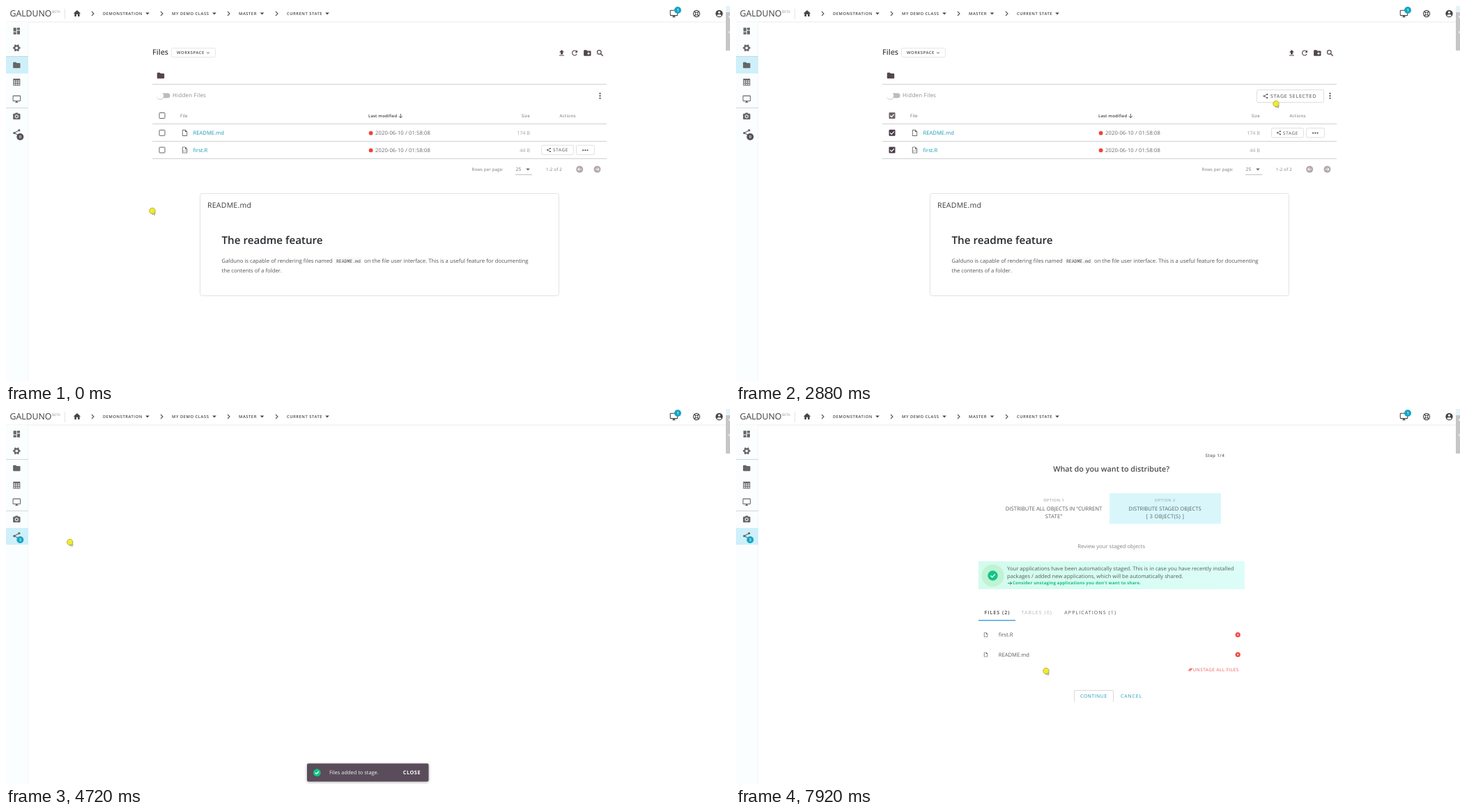
An HTML page with a canvas for the animation above (8 s loop, 1039 px wide and 539 px high).

```html
<!DOCTYPE html>
<html lang="en">
<head>
<meta charset="utf-8">
<title>Staging files</title>
<style>
html, body { margin: 0; width: 100%; height: 100%; overflow: hidden; background: #fff; }
canvas { display: block; width: 1039px; height: 539px; }
</style>
</head>
<body>
<canvas id="stage"></canvas>
<script>
const W = 1039, H = 539, LOOP = 8000, STEP = 80;
const canvas = document.getElementById('stage');
const c = canvas.getContext('2d');
const dpr = window.devicePixelRatio || 1;
canvas.width = W * dpr;
canvas.height = H * dpr;

const SANS = '"Open Sans", "Noto Sans", sans-serif';
const MONO = '"Noto Sans Mono", "DejaVu Sans Mono", monospace';
const TEAL = '#1899b8', BADGE = '#17a5c3', PLUM = '#54454f', GREY = '#666', RED = '#f2403a', GREEN = '#12c585';
const RULE = '#d2d0d2';

const PATHS = {
  home: 'M10 20v-6h4v6h5v-8h3L12 3 2 12h3v8z',
  tiles: 'M3 13h8V3H3zM3 21h8v-6H3zM13 21h8V11h-8zM13 3v6h8V3z',
  folder: 'M10 4H4a2 2 0 0 0-2 2v12a2 2 0 0 0 2 2h16a2 2 0 0 0 2-2V8a2 2 0 0 0-2-2h-8z',
  screen: 'M21 2H3a2 2 0 0 0-2 2v12a2 2 0 0 0 2 2h7v2H8v2h8v-2h-2v-2h7a2 2 0 0 0 2-2V4a2 2 0 0 0-2-2zM21 16H3V4h18z',
  file: 'M14 2H6a2 2 0 0 0-2 2v16a2 2 0 0 0 2 2h12a2 2 0 0 0 2-2V8zM6 20V4h7v5h5v11z',
  table: 'M2 2h20v20H2zM4 7v3h4V7zM10 7v3h4V7zM16 7v3h4V7zM4 12v3h4v-3zM10 12v3h4v-3zM16 12v3h4v-3zM4 17v3h4v-3zM10 17v3h4v-3zM16 17v3h4v-3z',
  camera: 'M9 3L7 5H4a2 2 0 0 0-2 2v12a2 2 0 0 0 2 2h16a2 2 0 0 0 2-2V7a2 2 0 0 0-2-2h-3l-2-2zM12 8a5 5 0 1 0 .01 0zM12 10a3 3 0 1 0 .01 0z',
  upload: 'M9 16h6v-6h4l-7-7-7 7h4zM5 18h14v2H5z'
};
for (const k in PATHS) PATHS[k] = new Path2D(PATHS[k]);

function text(s, x, y, size, color, ls = 0, weight = 400, align = 'left', family = SANS) {
  c.font = `${weight} ${size}px ${family}`;
  c.letterSpacing = ls + 'px';
  c.textAlign = align;
  c.fillStyle = color;
  c.fillText(s, x, y + size * 0.357);
}
function icon(name, x, y, size, color) {
  c.save();
  c.translate(x - size / 2, y - size / 2);
  c.scale(size / 24, size / 24);
  c.fillStyle = color;
  c.fill(PATHS[name], 'evenodd');
  c.restore();
}
function rect(x, y, w, h, color) {
  c.fillStyle = color;
  c.fillRect(x, y, w, h);
}
function box(x, y, w, h, r, fill, stroke) {
  c.beginPath();
  c.roundRect(x, y, w, h, r);
  if (fill) { c.fillStyle = fill; c.fill(); }
  if (stroke) { c.strokeStyle = stroke; c.lineWidth = 1; c.stroke(); }
}
function dot(x, y, r, fill, stroke, lw = 1) {
  c.beginPath();
  c.arc(x, y, r, 0, 7);
  if (fill) { c.fillStyle = fill; c.fill(); }
  if (stroke) { c.strokeStyle = stroke; c.lineWidth = lw; c.stroke(); }
}
function line(color, lw, ...p) {
  c.beginPath();
  for (let i = 0; i < p.length; i += 2) c.lineTo(p[i], p[i + 1]);
  c.strokeStyle = color;
  c.lineWidth = lw;
  c.stroke();
}
function caret(x, y, color) {
  c.beginPath();
  c.moveTo(x - 2.8, y - 1.4);
  c.lineTo(x + 2.8, y - 1.4);
  c.lineTo(x, y + 1.6);
  c.fillStyle = color;
  c.fill();
}
function tick(x, y, s, color, lw) {
  line(color, lw, x - s, y, x - s * 0.25, y + s * 0.7, x + s, y - s * 0.65);
}
function share(x, y, s, color) {
  line(color, s * 0.09, x + s * 0.27, y - s * 0.29, x - s * 0.27, y, x + s * 0.27, y + s * 0.29);
  for (const [i, j] of [[0.27, -0.29], [-0.27, 0], [0.27, 0.29]]) dot(x + i * s, y + j * s, s * 0.125, color);
}
function gear(x, y, r) {
  c.beginPath();
  for (let i = 0; i < 24; i++) {
    const a = (i + 0.5) * Math.PI / 12, k = (i + 1) % 4 < 2 ? r : r * 0.76;
    c.lineTo(x + k * Math.cos(a), y + k * Math.sin(a));
  }
  c.fillStyle = GREY;
  c.fill();
  dot(x, y, r * 0.35, '#fbfefe');
}
function badge(x, y, s, color) {
  dot(x, y, 5, color);
  text(s, x, y, 5.6, '#fff', 0, 600, 'center');
}

// Pointer track: time, x, y
const track = [
  [720, 210, 294.5], [1120, 224, 182], [1360, 224, 182], [1600, 224, 206], [2000, 224, 206],
  [2160, 400, 283], [2320, 640, 235], [2480, 778, 128.5], [2800, 778, 128.5], [2880, 775, 140.5],
  [2960, 782, 130], [3120, 782, 130], [3360, 480, 100], [3680, 24, 92], [4000, 25.5, 182.5],
  [4560, 25.5, 182.5], [5440, 390, 231.5], [5760, 390, 231.5], [6000, 389.5, 228.5], [6240, 389.5, 228.5],
  [6480, 548, 243.5], [6640, 645, 255], [6880, 645, 255], [7360, 560, 366], [7760, 480, 330],
  [7840, 455, 404], [7920, 445, 376.5]
];
const presses = [[1200, 1360], [1840, 2000], [3040, 3200], [4080, 4240], [6240, 6960]];
const clamp = v => Math.max(0, Math.min(1, v));

function pointer(t) {
  let a = track[0];
  for (const b of track) {
    if (t < b[0]) {
      const k = a === b ? 0 : clamp((t - a[0]) / (b[0] - a[0]));
      return [a[1] + (b[1] - a[1]) * k, a[2] + (b[2] - a[2]) * k];
    }
    a = b;
  }
  return [a[1], a[2]];
}
function hoveredRow(t) {
  const [x, y] = pointer(t);
  if (x < 210 || x > 862 || y < 170 || y > 219) return -1;
  return y < 194.5 ? 0 : 1;
}
function lastRow(t) {
  for (; t > 0; t -= STEP) {
    const r = hoveredRow(t);
    if (r >= 0) return r;
  }
  return 1;
}

function header() {
  rect(0, 22.5, W, 1, '#ececec');
  text('GALDUNO', 5.5, 11, 12.3, '#3c3c3c');
  text('BETA', 66, 8, 5, '#999');
  rect(84, 4, 1, 15, '#e4e4e4');
  icon('home', 102, 10.8, 12.5, '#444');
  const crumbs = [['DEMONSTRATION', 139, 203], ['MY DEMO CLASS', 238, 299], ['MASTER', 334, 367.5], ['CURRENT STATE', 403, 461]];
  for (const [s, x, cx] of crumbs) {
    const a = x - 16;
    line('#555', 1.1, a, 8, a + 3, 11, a, 14);
    text(s, x, 11, 5.8, '#444', 0.55, 600);
    caret(cx, 11, '#444');
  }
  icon('screen', 958.5, 11, 12.5, '#444');
  badge(964, 6, '1', BADGE);
  dot(991, 11, 4.6, null, '#444', 1.1);
  dot(991, 11, 2, null, '#444', 1);
  for (const [i, j] of [[1, 1], [1, -1], [-1, 1], [-1, -1]])
    line('#444', 1.6, 991 + i * 1.6, 11 + j * 1.6, 991 + i * 3.2, 11 + j * 3.2);
  dot(1023.5, 11, 5.2, '#444');
  dot(1023.5, 9.2, 1.6, '#fff');
  c.beginPath();
  c.ellipse(1023.5, 13.6, 3, 1.5, 0, 0, 7);
  c.fill();
  rect(1033, 0, 6, 9, '#e6f3f6');
  rect(1033, 9, 6, 55, '#c6c6c6');
  rect(1037, 14, 2, 3, '#e8e8e8');
  rect(1037, 36, 2, 3, '#e8e8e8');
}

function sidebar(t, onShare) {
  rect(0, 23, 32, H - 23, '#fbfefe');
  rect(31, 23, 1, H - 23, '#f0f5f6');
  if (t < 4720) {
    rect(0, 72, 32, 25, '#cef0fa');
    if (onShare) rect(0, 171, 32, 24, '#ebeef1');
  } else rect(0, 171, 32, 24, '#cef0fa');
  rect(0, 72, 32, 1, '#cfd5d6');
  rect(0, 146, 32, 1, '#cfd5d6');
  const x = 15.3;
  icon('tiles', x, 36, 12.5, GREY);
  gear(x, 60.3, 5.4);
  icon('folder', x, 85, 12.5, GREY);
  icon('table', x, 109.6, 12, GREY);
  icon('screen', x, 133.8, 12.5, GREY);
  icon('camera', x, 158.3, 12.5, GREY);
  share(x, 182.5, 13, GREY);
  const staged = t >= 3200;
  badge(20.3, 188, staged ? '3' : '0', staged ? BADGE : '#55505a');
}

function checkbox(y, mark) {
  if (!mark) return box(220, y - 4, 8, 8, 0.8, '#fff', '#666');
  box(219.5, y - 4.5, 9, 9, 1, mark === 'row' ? '#4b3d49' : '#6b646a');
  if (mark === 'some') rect(221.5, y - 0.6, 5, 1.2, '#fff');
  else tick(224, y, 2.9, '#fff', 1.2);
}

function filesPage(t) {
  const first = t >= 1280, second = t >= 1920;
  text('Files', 210, 66.5, 10.7, '#4c464c', 0, 600);
  box(237.5, 60.5, 63, 13, 2, '#fff', '#e6e6e6');
  text('WORKSPACE', 245, 67, 5.8, '#4c464c', 0.6, 600);
  line('#555', 0.9, 288, 66.4, 290, 68.2, 292, 66.4);

  icon('upload', 797.5, 67.5, 12, PLUM);
  c.beginPath();
  c.arc(816, 67.5, 3.4, 0.4, 5.6);
  c.strokeStyle = PLUM;
  c.lineWidth = 1.1;
  c.stroke();
  c.beginPath();
  c.moveTo(820, 63.4);
  c.lineTo(820, 67);
  c.lineTo(816.4, 67);
  c.fillStyle = PLUM;
  c.fill();
  icon('folder', 834.3, 67.5, 12.5, PLUM);
  line('#fff', 1, 834, 68.2, 838, 68.2);
  line('#fff', 1, 836, 66.2, 836, 70.2);
  dot(851.3, 66.4, 2.8, null, PLUM, 1.2);
  line(PLUM, 1.4, 853.4, 68.5, 856.6, 71.7);

  icon('folder', 222, 100, 12.5, PLUM);
  rect(210, 112, 652, 1, RULE);
  box(220, 125.3, 15.5, 7, 3.5, '#bcbcbc');
  dot(221.3, 129.6, 5.3, '#d4d4d4');
  dot(221, 128.8, 5, '#fff');
  text('Hidden Files', 239, 128.5, 8, '#8c8c8c', 0.2);
  for (const d of [-3.5, 0, 3.5]) dot(852.5, 129.2 + d, 1.1, '#4c464c');
  if (first) {
    box(747.5, 120.5, 96, 18, 2, '#fff', '#e0dee0');
    share(760, 129.5, 8.5, PLUM);
    text('STAGE SELECTED', 767, 129.5, 7, '#4c464c', 0.8);
  }

  const hover = hoveredRow(t), last = lastRow(t);
  if (hover >= 0) rect(210, 170 + hover * 24.5, 652, 24.5, '#f2eff1');
  checkbox(157.5, second ? 'all' : first ? 'some' : null);
  text('File', 250, 157.5, 6.2, '#6a6a6a', 0.25);
  text('Last modified', 520, 157.5, 5.9, '#3c3c3c', 0.2, 600);
  line('#444', 0.9, 566.3, 155, 566.3, 160.6);
  line('#444', 0.9, 563.8, 158.2, 566.3, 160.8, 568.8, 158.2);
  text('Size', 739.8, 157.5, 6.1, '#6a6a6a', 0.2);
  text('Actions', 794.5, 157.5, 6.1, '#6a6a6a', 0.35);
  for (const y of [169, 194, 219]) rect(210, y, 652, 1, RULE);

  const rows = [['README.md', '174 B', first], ['first.R', '44 B', second]];
  rows.forEach(([name, size, on], i) => {
    const y = 182.3 + i * 24.7;
    checkbox(y, on && 'row');
    icon('file', 256.5, y, 11, GREY);
    if (i) {
      line(GREY, 0.7, 255.8, y, 254.6, y + 1.3, 255.8, y + 2.6);
      line(GREY, 0.7, 257.2, y, 258.4, y + 1.3, 257.2, y + 2.6);
    }
    text(name, 268.5, y, 7.65, TEAL);
    dot(523.6, y + 0.4, 2.9, RED);
    text('2020-06-10 / 01:58:08', 530, y, 7.6, '#686868', 0.12);
    text(size, 752, y, 7.2, '#a2a2a2', 0, 400, 'right');
    if (i === last) {
      const fill = i === hover ? null : '#fff';
      box(768.5, y - 6.8, 46, 13.5, 2, fill, '#e2dfe1');
      share(779, y, 7.5, PLUM);
      text('STAGE', 785, y, 6.2, '#4c464c', 0.75);
      box(818.5, y - 6.8, 26, 13.5, 2, fill, '#e2dfe1');
      for (const d of [-3.2, 0, 3.2]) dot(831.3 + d, y + 0.3, 1.05, '#4c464c');
    }
  });

  text('Rows per page:', 668.5, 234.5, 6.1, '#777', 0.15);
  text('25', 731.5, 235, 6.8, '#777');
  caret(749, 235, '#666');
  rect(731, 242, 24, 1, '#c2c2c2');
  text('1-2 of 2', 775, 234.5, 6.1, '#777', 0.2);
  for (const [x, d] of [[823.2, -1], [848.5, 1]]) {
    dot(x, 234.7, 5, '#b4a9b2');
    line('#fff', 1, x - 2.6 * d, 234.7, x + 2.6 * d, 234.7);
    line('#fff', 1, x + 0.2 * d, 232.3, x + 2.6 * d, 234.7, x + 0.2 * d, 237.1);
  }

  box(278.5, 269.5, 515, 147, 3, '#fff', '#e2e2e2');
  text('README.md', 289, 286.5, 10.5, '#3a3a3a', 0.25);
  text('The readme feature', 309.5, 337, 15.2, '#24292e', 0, 600);
  text('Galduno is capable of rendering files named', 309.5, 366, 7.76, '#555');
  rect(472, 361, 39, 10, '#f9f9f9');
  text('README.md', 474, 366.2, 6.45, '#444', 0, 400, 'left', MONO);
  text('on the file user interface. This is a useful feature for documenting', 514, 366, 7.76, '#555');
  text('the contents of a folder.', 309.5, 380, 7.76, '#555');
}

function selection(t) {
  if (t < 6240 || t >= 7120) return;
  const [x, y] = pointer(Math.min(t, 6640));
  const row = Math.floor((y - 223.5) / 10.6);
  [717, 644, 582].forEach((end, i) => {
    if (i <= row) rect(389, 223 + i * 11, (i < row ? end : Math.min(x, end)) - 389, 11, '#92cfee');
  });
}

function distributePage(t) {
  text('Step 1/4', 673.5, 67, 6.3, '#666', 0.35, 600);
  text('What do you want to distribute?', 538.7, 86.5, 10.8, '#4c4c4c', 0, 600, 'center');
  rect(536, 121, 160, 44, '#d9f7fb');
  text('OPTION 1', 456.2, 131, 5.5, '#888', 0.6, 400, 'center');
  text('DISTRIBUTE ALL OBJECTS IN “CURRENT', 456, 143, 7.7, '#5a5a5a', 0, 400, 'center');
  text('STATE”', 456, 154, 7.7, '#5a5a5a', 0.2, 400, 'center');
  text('OPTION 2', 615.8, 131, 5.5, '#7f9a9f', 0.6, 400, 'center');
  text('DISTRIBUTE STAGED OBJECTS', 615.5, 143, 7.65, '#566', 0, 400, 'center');
  text('[ 3 OBJECT(S) ]', 615.8, 154, 7.65, '#566', 0.3, 400, 'center');
  text('Review your staged objects', 538.7, 197.5, 7.69, '#858585', 0, 400, 'center');

  const g = c.createLinearGradient(348, 0, 730, 0);
  g.addColorStop(0, '#d3fbec');
  g.addColorStop(1, '#dcfdf8');
  rect(348, 219, 382, 40, g);
  selection(t);
  dot(368.5, 239.5, 16, '#bff3d4');
  dot(368.5, 239.5, 7.2, GREEN);
  tick(368.5, 239.5, 3.3, '#fff', 1.4);
  text('Your applications have been automatically staged. This is in case you have recently installed', 389, 229, 7.66, '#52605c');
  text('packages / added new applications, which will be automatically shared.', 389, 240, 7.68, '#52605c');
  line('#2b7a5e', 0.9, 390, 250.4, 395.6, 250.4);
  line('#2b7a5e', 0.9, 393.2, 248, 395.7, 250.4, 393.2, 252.8);
  text('Consider unstaging applications you don\'t want to share.', 397, 250.3, 6.1, '#14bd82', 0.2, 700);

  text('FILES (2)', 356.5, 292.5, 7, '#444', 1.05, 600);
  text('TABLES (0)', 409.5, 292.5, 7, '#b4b4b4', 1.07);
  text('APPLICATIONS (1)', 471.3, 292.5, 7, '#555', 1.1);
  rect(348, 303, 53, 1.6, '#5aa5dc');

  const [px, py] = pointer(t);
  ['first.R', 'README.md'].forEach((name, i) => {
    const y = 324.5 + i * 28.5;
    if (px > 351 && px < 723 && Math.abs(py - y) < 14) rect(351, y - 14, 372, 28, '#f8f8f8');
    icon('file', 358.5, y, 8, '#555');
    text(name, 376.7, y, 7.65, '#5a5a5a');
    dot(720.2, y, 3.6, RED);
    line('#fff', 0.9, 718.9, y - 1.3, 721.5, y + 1.3);
    line('#fff', 0.9, 721.5, y - 1.3, 718.9, y + 1.3);
  });
  for (let i = 0; i < 3; i++) line('#ee5350', 1, 650 - i * 0.9 + 0.8, 373.2 + i * 1.4, 655 - i * 0.9, 373.2 + i * 1.4);
  text('UNSTAGE ALL FILES', 655.7, 374.5, 6.3, '#ee5350', 0.55);

  line('#dadada', 1, 485.5, 421, 485.5, 404.5, 541.5, 404.5, 541.5, 421);
  text('CONTINUE', 494, 413, 6.8, TEAL, 0.55);
  text('CANCEL', 552, 413, 6.8, TEAL, 0.95);
}

function snackbar(t) {
  const a = Math.min(clamp((t - 3120) / 240), clamp((6000 - t) / 240));
  if (!a) return;
  c.save();
  c.globalAlpha = a;
  c.shadowColor = 'rgba(0,0,0,.3)';
  c.shadowBlur = 4 * dpr;
  c.shadowOffsetY = dpr;
  box(432, 509.5, 174.5, 26, 2, '#5a4c5a');
  c.shadowColor = 'transparent';
  dot(446.3, 522.7, 5.4, GREEN);
  tick(446.3, 522.7, 2.6, '#fff', 1.2);
  text('Files added to stage.', 464, 522.5, 7.45, '#f4f2f4');
  text('CLOSE', 569.7, 522.5, 7.4, '#fff', 0.5, 700);
  c.restore();
}

function statusBar() {
  rect(0, 531, 345, 8, '#2e2a33');
  text('https://galduno.cloud/org/32/space/316/instance/3055/snapshot/24326/distribute', 1, 535.2, 4.6, '#eee');
}

function drawPointer(t, x, y) {
  const down = presses.some(([a, b]) => t >= a && t < b);
  if (down) return dot(x, y, 14.8, '#feea30', '#6f6a2c', 0.9);
  const overText = t >= 4880 && y > 219 && y < 259;
  if (!overText) {
    c.beginPath();
    for (const [i, j] of [[0, 0], [0, 6], [1.4, 4.8], [2.6, 7], [3.7, 6.4], [2.7, 4.3], [4.6, 4.2]]) c.lineTo(x + i, y - 0.8 + j);
    c.closePath();
    c.fillStyle = '#fff';
    c.fill();
    c.strokeStyle = '#888';
    c.lineWidth = 0.8;
    c.stroke();
  }
  dot(x, y, 4.2, 'rgba(242,236,28,.92)', '#a39c35', 0.8);
}

function draw(t) {
  c.setTransform(dpr, 0, 0, dpr, 0, 0);
  c.textRendering = 'geometricPrecision';
  rect(0, 0, W, H, '#fff');
  const [x, y] = pointer(t);
  const onShare = x < 32 && y > 171 && y < 195;
  header();
  sidebar(t, onShare);
  if (t < 4160) filesPage(t);
  else if (t >= 4880) distributePage(t);
  snackbar(t);
  if (onShare) statusBar();
  drawPointer(t, x, y);
}

const start = performance.now();
function tickFrame() {
  const t = Math.max(0, performance.now() - start) % LOOP;
  draw(Math.floor(t / STEP) * STEP);
  requestAnimationFrame(tickFrame);
}
tickFrame();
</script>
</body>
</html>
```
